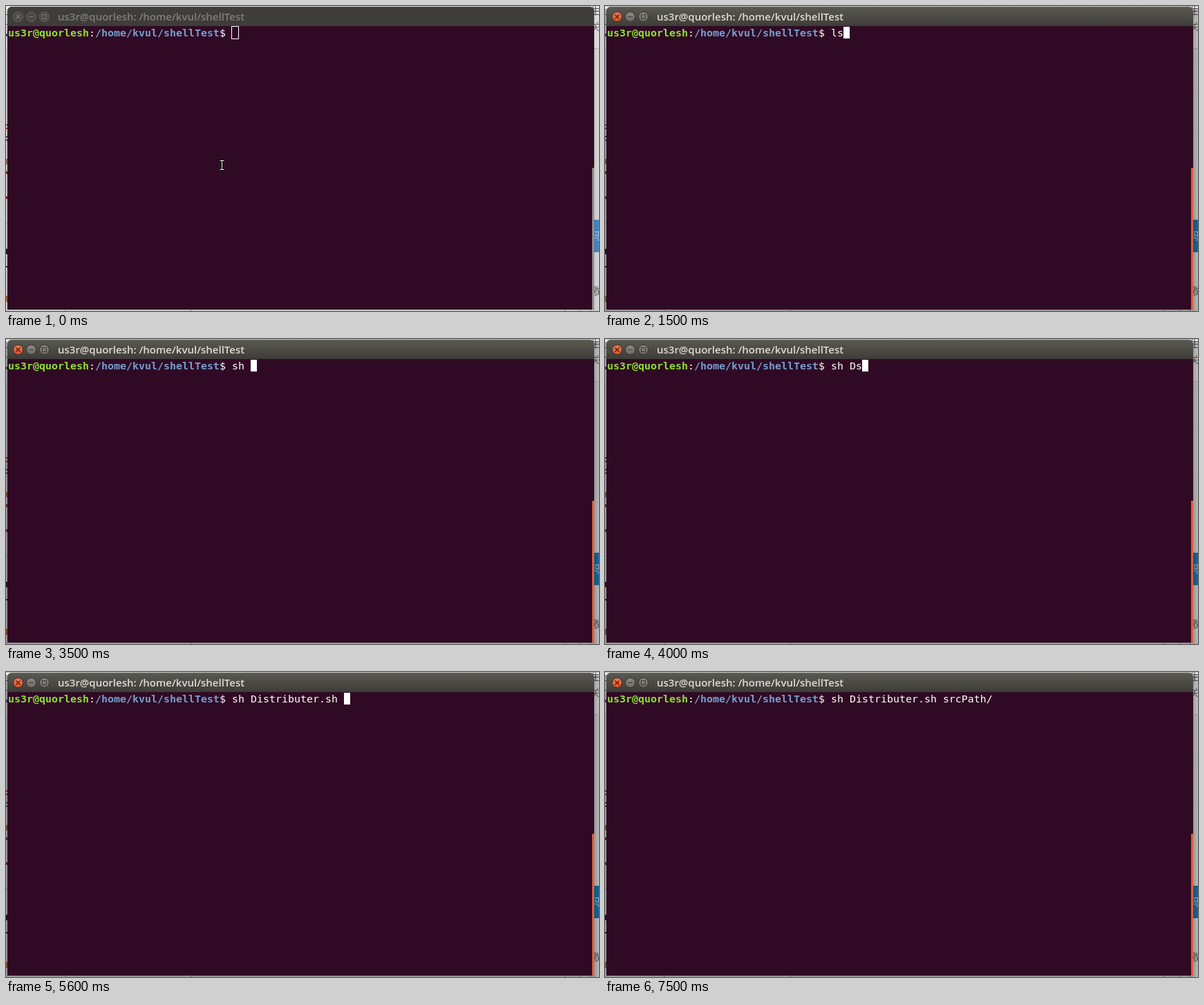
An HTML page with a canvas that plays this animation: 858 px wide and 441 px high, repeating every 8 s.

```html
<!DOCTYPE html>
<html lang="en">
<head>
<meta charset="utf-8">
<title>Terminal</title>
<style>
  html, body { margin: 0; width: 100%; height: 100%; overflow: hidden; }
  canvas { display: block; }
</style>
</head>
<body>
<canvas id="stage" width="858" height="441"></canvas>
<script>
const ctx = document.getElementById('stage').getContext('2d');
const LOOP = 8000;
const USER = 'us3r@quorlesh';
const FOLDER = '/home/kvul/shellTest';
const CELL = 9, LEFT = 3, BASELINE = 44;
const MONO = '14.95px "DejaVu Sans Mono", monospace';

// [start in ms, typed text, cursor lit]
const steps = [
  [0, '', true], [800, '', false],
  [1300, 'l', true], [1500, 'ls', true], [2000, 'ls', false],
  [2200, 'l', true], [2400, '', true], [3000, '', false],
  [3100, 's', true], [3300, 'sh', true], [3500, 'sh ', true],
  [3800, 'sh D', true], [4000, 'sh Ds', true], [4900, 'sh D', true],
  [5200, 'sh Di', true], [5600, 'sh Distributer.sh ', true],
  [6300, 'sh Distributer.sh ', false], [6500, 'sh Distributer.sh ', true],
  [6700, 'sh Distributer.sh s', true],
  [6900, 'sh Distributer.sh srcPath/', true],
  [7500, 'sh Distributer.sh srcPath/', false]
];

function rect(x, y, w, h, color) {
  ctx.fillStyle = color;
  ctx.fillRect(x, y, w, h);
}

function text(string, x, y, font, color) {
  ctx.font = font;
  ctx.fillStyle = color;
  ctx.fillText(string, x, y);
}

function gradient(x0, y0, x1, y1, from, to) {
  const g = ctx.createLinearGradient(x0, y0, x1, y1);
  g.addColorStop(0, from);
  g.addColorStop(1, to);
  return g;
}

function line(points, color, width = 1) {
  ctx.beginPath();
  points.forEach(([x, y, move]) => move ? ctx.moveTo(x, y) : ctx.lineTo(x, y));
  ctx.strokeStyle = color;
  ctx.lineWidth = width;
  ctx.stroke();
}

// The page behind the window, seen only along its edges.
function drawPage(focused) {
  rect(0, 0, 858, 441, '#e6e6e7');
  rect(0, 0, 858, 62, '#f1f1f1');
  rect(851, 61, 7, 1, '#c8c8c8');
  rect(851, 309, 7, 47, focused ? '#1e7fbe' : '#4a90d0');

  const cjk = '14px "Noto Sans CJK SC", "Noto Sans CJK", sans-serif';
  text('生:', 846, 12, cjk, '#555');
  text('关', 846, 35, cjk, '#777');
  text('码', 846, 337, cjk, '#d4e6f2');
  text('激', 846, 417, cjk, '#666');

  const marks = [
    [12, 1, '#555'], [26, 1, '#555'], [40, 4, '#557'], [171, 2, '#a33'],
    [176, 2, '#a33'], [188, 2, '#555'], [193, 2, '#555'], [221, 8, '#a75'],
    [239, 4, '#933'], [275, 4, '#933'], [313, 1, '#aaa'], [351, 8, '#222'],
    [376, 2, '#222'], [419, 9, '#b73']
  ];
  for (const [y, h, color] of marks) rect(0, y, 2, h, color);
  for (const x of [85, 267, 808, 830, 845]) rect(x, 440, 2, 1, '#999');

  const near = `rgba(0,0,0,${focused ? .34 : .14})`;
  const far = `rgba(0,0,0,${focused ? .2 : .06})`;
  rect(0, 4, 2, 437, near);
  rect(851, 4, 7, 437, gradient(851, 0, 858, 0, near, far));
  rect(2, 439, 849, 2, near);
  rect(0, 0, 858, 1, far);
}

function drawButton(x, fill, ring, mark) {
  ctx.beginPath();
  ctx.arc(x, 15.5, 7, 0, Math.PI * 2);
  ctx.fillStyle = fill;
  ctx.fill();
  ctx.strokeStyle = ring;
  ctx.lineWidth = 1;
  ctx.stroke();
  return mark;
}

function drawTitleBar(focused) {
  ctx.beginPath();
  ctx.roundRect(2, 1, 849, 28, [6, 6, 0, 0]);
  ctx.fillStyle = focused ? gradient(0, 1, 0, 29, '#5a5951', '#3d3c38') : '#3e3d39';
  ctx.fill();
  rect(8, 1, 837, 1, focused ? '#6b6a61' : '#4a4944');

  const grey = focused ? gradient(0, 8, 0, 23, '#8b8980', '#6d6b64') : '#4b4a45';
  const orange = gradient(0, 8, 0, 23, '#f47b58', '#e2501f');
  const ring = focused ? '#33322e' : '#696761';
  const mark = focused ? '#3b3a36' : '#7b7973';
  [17.5, 36.5, 55.5].forEach((x, i) => drawButton(x, focused && !i ? orange : grey, ring));
  line([[14.5, 12.5, true], [20.5, 18.5], [20.5, 12.5, true], [14.5, 18.5]],
    focused ? '#4c1d10' : mark, 1.2);
  line([[33, 15.5, true], [40, 15.5]], mark);
  ctx.strokeRect(52.5, 12.5, 6, 6);

  const font = '600 15px "Open Sans", "Noto Sans", sans-serif';
  text(`${USER}: ${FOLDER}`, 75, 21, font, focused ? '#dfdbd2' : '#817e77');
}

function drawPrompt(typed, lit, focused) {
  let column = 0;
  const write = (string, color, weight = '') => {
    text(string, LEFT + column * CELL, BASELINE, weight + MONO, color);
    column += string.length;
  };
  write(USER, '#8ae234', 'bold ');
  write(':', '#fff');
  write(FOLDER, '#729fcf', 'bold ');
  write('$ ', '#fff');
  write(typed, '#fff');

  const x = LEFT + column * CELL;
  if (!focused) {
    ctx.strokeStyle = '#fff';
    ctx.lineWidth = 1;
    ctx.strokeRect(x - .5, 29.5, 10, 18);
  } else if (lit) {
    rect(x, 30, CELL, 17, '#fff');
  }
}

function drawPointer() {
  const beam = [
    [309.5, 223.5, true], [315.5, 223.5], [312.5, 223.5, true],
    [312.5, 236.5], [309.5, 236.5, true], [315.5, 236.5]
  ];
  line(beam, '#000', 3);
  line(beam, '#fff');
}

function draw(time) {
  const focused = time >= 200;
  const [, typed, lit] = steps.findLast(([start]) => start <= time);
  drawPage(focused);
  drawTitleBar(focused);
  rect(2, 29, 849, 410, '#300a24');
  rect(848, 234, 3, 205, focused ? '#dd5f38' : '#918b8e');
  drawPrompt(typed, lit, focused);
  if (time < 1300) drawPointer();
}

function frame() {
  draw(performance.now() % LOOP);
  requestAnimationFrame(frame);
}
frame();
</script>
</body>
</html>
```
